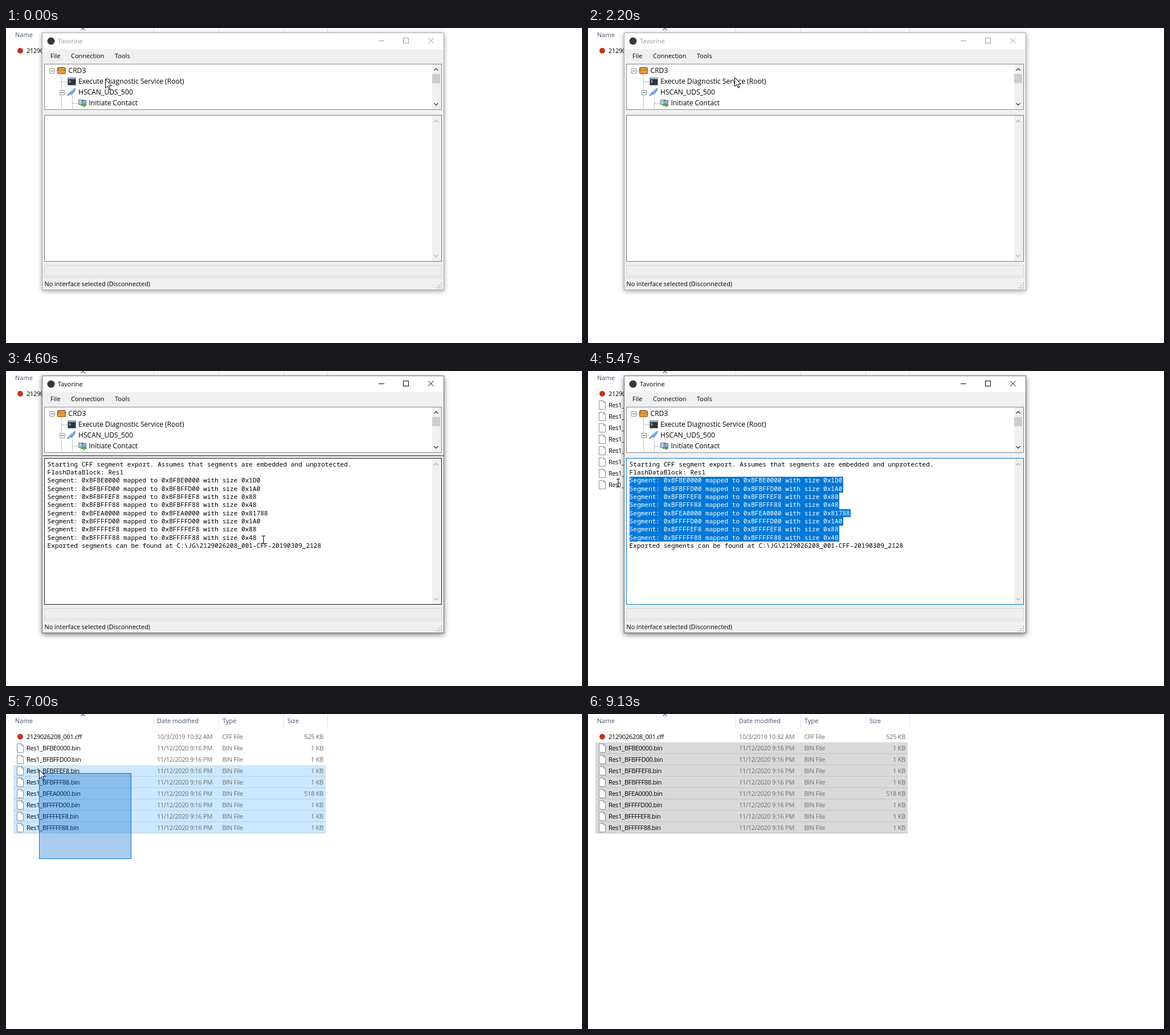
Recreate the animation shown at these times as an HTML page. Size 1011 by 554 pixels, loop 9.19 s.

```html
<!DOCTYPE html>
<html lang="en">
<head>
<meta charset="utf-8">
<title>Segment export</title>
<style>
html, body { margin: 0; width: 100%; height: 100%; overflow: hidden; background: #fff; }
svg { display: block; width: 1011px; height: 554px; }
text { font: 11px "Open Sans", "Noto Sans", sans-serif; fill: #000; white-space: pre; }
text.num { letter-spacing: -.3px; }
text.tree { font-size: 12.1px; }
text.status { font-size: 10.9px; }
text.mono { font: 500 11.13px "Noto Sans Mono", "DejaVu Sans Mono", monospace; }
rect { shape-rendering: crispEdges; }
</style>
</head>
<body>
<svg id="stage" viewBox="0 0 1011 554" xmlns="http://www.w3.org/2000/svg"></svg>
<script>
const TICK = 1000 / 15, LOOP = 9190;
const GREY = '#6d6d6d', BLUE = '#0078d7', HEAD = '#44546f';

// ---- drawing helpers ----
const box = (x, y, w, h, fill, stroke, more = '') => stroke
  ? `<rect x="${x + .5}" y="${y + .5}" width="${w - 1}" height="${h - 1}" fill="${fill}" stroke="${stroke}" ${more}/>`
  : `<rect x="${x}" y="${y}" width="${w}" height="${h}" fill="${fill}" ${more}/>`;
const line = (d, color, more = '') => `<path d="${d}" fill="none" stroke="${color}" ${more}/>`;
const fill = (d, color) => `<path d="${d}" fill="${color}"/>`;
const dot = (x, y, r, color) => `<circle cx="${x}" cy="${y}" r="${r}" fill="${color}"/>`;
const text = (x, mid, str, cls = '', color = '#000', more = '') =>
  `<text x="${x}" y="${mid + 4}" class="${cls}" style="fill:${color}" ${more}>${str}</text>`;
const group = (id, body, more = '') => `<g id="${id}" ${more}>${body}</g>`;
const chevron = (x, y, dir, color, s = 3.5) => {
  const turn = { up: 0, right: 90, down: 180 }[dir];
  return line(`M${-s} ${s / 2}L0 ${-s / 2}L${s} ${s / 2}`, color,
    `stroke-width="1.5" transform="translate(${x} ${y}) rotate(${turn})"`);
};
const grip = (x, y) => [[2, 0], [1, 1], [2, 1], [0, 2], [1, 2], [2, 2]]
  .map(([i, j]) => box(x + i * 4, y + j * 4, 2, 2, '#b4b4b4')).join('');

const shadow = (id, dev, dy, alpha) =>
  `<filter id="${id}" x="-10%" y="-10%" width="120%" height="120%">
  <feDropShadow dx="0" dy="${dy}" stdDeviation="${dev}" flood-opacity="${alpha}"/></filter>`;

// ---- icons ----
const cffIcon = (x, y) => dot(x, y, 5, '#c8321f');
const page = (x, y) =>
  `<path d="M${x + .5} ${y - 7.5}h8l3 3v12h-11z" fill="#fff" stroke="#8c8c8c"/>` +
  line(`M${x + 8.5} ${y - 7.5}v3h3`, '#8c8c8c');
const folder = (x, y) => box(x, y - 7, 6, 3, '#eec55c') + box(x, y - 6, 12, 14, '#fcdf8b', '#efcd6b');

// ---- file listing ----
const names = ['BFBE0000', 'BFBFFD00', 'BFBFFEF8', 'BFBFFF88', 'BFEA0000', 'BFFFFD00', 'BFFFFEF8', 'BFFFFF88'];
const sizes = ['1D0', '1A0', '88', '48', '81788', '1A0', '88', '48'];
const rowTop = i => 30 + i * 20;

function columns(x, y, h) {
  return text(x, y, 'Name', '', HEAD) + text(x + 249, y, 'Date modified', '', HEAD) +
    text(x + 364, y, 'Type', '', HEAD) + text(x + 478, y, 'Size', '', HEAD) +
    [243, 357, 471, 548].map(dx => box(x + dx, y - 12, 1, h, '#e3e3e3')).join('') +
    chevron(x + 119, y - 10, 'up', '#777');
}
function cells(x, y, name, date, type, size) {
  return text(x, y, name, 'num') + text(x + 229, y, date, 'num', GREY) +
    text(x + 343.5, y, type, 'num', GREY) + text(x + 521, y, size, 'num', GREY, 'text-anchor="end"');
}
const cffRow = (x, y) => cffIcon(x - 11, y) +
  cells(x, y, '2129026208_001.cff', '10/3/2019 10:32 AM', 'CFF File', '525 KB');

function explorer() {
  const bands = Array.from({ length: 9 }, (_, i) =>
    group('row' + i, box(13, rowTop(i), 548, 20, 'currentColor') +
      box(13, rowTop(i) + 19, 548, 1, '#000', '', `id="edge${i}" opacity=".1"`))).join('');
  const files = names.map((n, i) => page(19, rowTop(i + 1) + 10) +
    cells(36, rowTop(i + 1) + 10, `Res1_${n}.bin`, '11/12/2020 9:16 PM', 'BIN File', i == 4 ? '518 KB' : '1 KB')).join('');
  return columns(16, 12, 24) + bands + cffRow(36, 40) + group('files', files);
}

// ---- main window ----
const log = ['Starting CFF segment export. Assumes that segments are embedded and unprotected.',
  'FlashDataBlock: Res1',
  ...names.map((n, i) => `Segment: 0x${n} mapped to 0x${n} with size 0x${sizes[i]}`),
  'Exported segments can be found at C:\\JG\\2129026208_001-CFF-20190309_2128'];
const CHAR = 6.678, ROW = 14.3, LOGX = 72.6, LOGY = 156.9;
const logText = color => log.map((s, i) => text(LOGX, LOGY + ROW * (i + .5) - .2, s, 'mono', color)).join('');
const SEGS = [2, 3, 4, 5, 6, 7, 8, 9];

function tree() {
  const dots = d => line(d, '#8a8a8a', 'stroke-dasharray="1 1" shape-rendering="crispEdges"');
  const minus = (x, y) => box(x - 4, y - 4, 9, 9, '#fff', '#919191') + box(x - 2, y, 5, 1, '#3c5a96');
  return dots('M85 75.5H90M97.5 83V143M98 94.5H107M102 113.5H107M116.5 121V143M117 132.5H126') +
    minus(80, 75) + minus(98, 113) +
    fill('M90 71q0-2 2-2h9q4 0 4 3v7q0 2-2 2H92q-2 0-2-2z', '#9c560f') +
    fill('M91 74h13v5q0 1-1 1H92q-1 0-1-1z', '#e39a3a') + box(92, 71, 11, 2, '#f0c27c') +
    box(108, 87, 15, 14, '#2b3441', '#77899c') + box(109, 88, 13, 2, '#9fb2c8') + line('M110.5 92l3 2-3 2', '#fff') +
    line('M108 119l4-4M118 110l4-4', '#547bb0', 'stroke-width="2"') +
    fill('M111 113l7-6q3 0 4 3l-6 7q-4 1-5-4z', '#6da0dc') + line('M113 113l6-5', '#b9d6f6', 'stroke-width="1.5"') +
    box(127, 126, 10, 9, '#b9c8dc', '#66778c') + box(133, 127, 8, 10, '#8fb0dc', '#5f7390') +
    fill('M131 134h5v-3l5 4.500-5 4.500v-3h-5z', '#4aa83c') +
    text(109.5, 75, 'CRD3', 'tree') + text(127, 94, 'Execute Diagnostic Service (Root)', 'tree') +
    text(127, 113, 'HSCAN_UDS_500', 'tree') + text(145.5, 132, 'Initiate Contact', 'tree');
}

function mainWindow() {
  return box(63, 8, 706, 453, '#f0f0f0', '', 'id="frame"') +
    box(64, 9, 704, 28, '#fff') +
    dot(79, 23, 6.5, '#383838') + text(91, 22.5, 'Tavorine', '', '#000', 'id="title"') +
    group('buttons', `<path d="M654 22.500h10M697.500 17.500h9v9h-9z" shape-rendering="crispEdges"/><path d="M741 17.500l9.500 9.500M750.500 17.500l-9.500 9.500"/>`, 'fill="none" stroke="#000"') +
    box(182, 39, 45, 19, '#b5d7f3', BLUE, 'id="hot"') +
    text(78, 48.5, 'File') + text(114, 48.5, 'Connection') + text(191, 48.5, 'Tools') +
    box(67, 63, 698, 81, '#fff', '#828790') + tree() +
    box(748, 64, 16, 79, '#f0f0f0') + chevron(755, 73, 'up', '#444') + chevron(755, 134, 'down', '#444') +
    box(748, 81, 14, 16, '#cdcdcd') +
    group('split', line('M65 148.500H768M66 149.500H768', '#000', 'stroke-dasharray="1 1" shape-rendering="crispEdges"')) +
    box(67, 153, 698, 258, '#fff', '#7a7a7a', 'id="pane"') +
    box(748, 154, 16, 256, '#f0f0f0') + chevron(755, 164, 'up', '#b8b8b8') + chevron(755, 401, 'down', '#b8b8b8') +
    group('log', logText('#000') +
      SEGS.map(i => `<rect class="sel" fill="${BLUE}"/>`).join('') +
      `<clipPath id="selClip">${SEGS.map(() => '<rect class="cut"/>').join('')}</clipPath>` +
      `<g clip-path="url(#selClip)">${logText('#fff')}</g>`) +
    box(67, 417, 698, 20, '#eee', '#d4d4d4') + box(64, 439, 704, 1, '#dcdcdc') +
    text(67.5, 450, 'No interface selected (Disconnected)', 'status') + grip(755, 448) +
    box(63, 8, 706, 453, 'none', '#777', 'id="rim"');
}

function toolsMenu() {
  const items = ['Flash File Splicer', 'Export CFF Flash Segments', 'Fix Client Access Permissions'];
  return box(183, 57, 215, 66, '#fdfdfd', '#808080', 'filter="url(#menuShadow)"') +
    box(184, 58, 24, 64, '#f4f4f4') +
    items.map((s, i) => box(185, 59 + i * 21, 211, 21, '#b5d7f3', BLUE, `id="item${i}"`) +
      text(215, 69.5 + i * 21, s)).join('');
}

// ---- file dialog ----
function navPane() {
  const icon = {
    cube: fill('M104 282l6-3 7 3v9l-7 3-6-3z', '#35b5d3') + fill('M104 282l6 3v9l-6-3z', '#8fdcea'),
    desk: box(102, 303, 16, 12, '#1a8fe8', '#1a6fb5'),
    docs: box(104, 324, 12, 16, '#fff', '#8a8a8a') + line('M106 328.500h8M106 331.500h8M106 334.500h8M106 337.500h8', '#7a8ea5'),
    down: fill('M107 347h5v7h5l-7.500 8-7.500-8h5z', '#3382d8'),
    note: line('M109.500 383v-12q1 4 5 5', '#1f86dc', 'stroke-width="2"') + dot(107, 383, 2.800, '#1f86dc'),
    pics: box(102, 394, 16, 13, '#fff', '#8a8a8a') + box(104, 396, 12, 5, '#9ed3f2') + box(104, 401, 12, 4, '#3d7d9d'),
    film: box(103, 416, 14, 16, '#333') + box(106, 418, 8, 6, '#7a92c6') + box(106, 425, 8, 5, '#b58b57'),
    disk: box(102, 449, 15, 5, '#555') + box(113, 451, 2, 1, '#7ee06c') + box(102, 441, 6, 6, '#25a5e2'),
    more: fill('M100 472q4-4 9 0z', '#4d93cc')
  };
  return [141, 164, 187, 210, 233].map(y => folder(104, y)).join('') +
    box(94, 256, 16, 11, '#45b5ef', '#3a7ca8') + box(97, 269, 10, 1, '#6c7a86') + text(114, 263, 'T') +
    box(72, 436, 49, 22, '#d9d9d9') + Object.values(icon).join('') +
    box(121, 130, 14, 342, '#f0f0f0') + box(121, 224, 14, 212, '#cdcdcd') +
    chevron(128, 139, 'up', '#444') + chevron(128, 464, 'down', '#444');
}

function dialog() {
  const crumbs = [[211, 'This PC'], [271, 'Local Disk (C:)'], [364, 'JG'], [398, '2129026208_001-CFF-20190309_2128']];
  const arrow = (x, turn, color) => line('M5.500 0H-5M-1 -4.500L-5.500 0L-1 4.500', color,
    `stroke-width="1.500" transform="translate(${x} 83) rotate(${turn})"`);
  return box(71, 38, 902, 508, '#fff', '#5f6468', 'filter="url(#dialogShadow)"') +
    dot(87, 53, 6.5, '#383838') + text(99, 52, 'Select a CFF File') +
    line('M953 47l9 9M962 47l-9 9', '#000', 'stroke-width="1.200"') +
    arrow(90, 0, '#d0d0d0') + arrow(117, 180, '#d0d0d0') + chevron(140, 83, 'down', '#d0d0d0', 2.5) + arrow(160, 90, '#555') +
    box(173, 72, 585, 22, '#fff', '#d9d9d9') + folder(177, 82) +
    crumbs.map(([x, s], i) => chevron(x - 11, 82.5, 'right', '#555', 2.8) + text(x, 82, s, i == 3 ? 'num' : '')).join('') +
    chevron(727, 83.5, 'down', '#555') + box(736, 73, 1, 20, '#d9d9d9') +
    line('M749.500 80.500A3.800 3.800 0 1 1 745 79.500M750 77.500v3.500h-3.500', '#555', 'stroke-width="1.300"') +
    box(768, 72, 192, 22, '#fff', '#d9d9d9') + text(777, 82.5, 'Search 2129026208_001-CFF-2...', 'num', GREY) +
    `<circle cx="948.5" cy="81.5" r="3" fill="none" stroke="#555" stroke-width="1.300"/>` + line('M946.500 84l-4 4', '#555', 'stroke-width="1.500"') +
    box(72, 101, 900, 28, '#f5f6f7') + text(89, 114.5, 'Organize', '', '#1e395b') +
    fill('M138 112h8l-4 5z', '#1e395b') + text(175, 114.5, 'New folder', '', '#1e395b') +
    [0, 4, 8].map(d => box(856, 109 + d, 3, 2, '#71869f') + box(861, 109 + d, 4, 1, '#8b9bae') + box(867, 109 + d, 4, 1, '#8b9bae')).join('') +
    fill('M880 112h7l-3.500 5z', '#1e395b') + box(908, 109, 15, 11, '#fff', '#3c6893') + box(917, 110, 5, 9, '#2f91dc') +
    dot(950, 114.5, 7.5, '#0a62b5') + text(950, 114.5, '?', '', '#fff', 'text-anchor="middle" font-weight="700"') +
    navPane() +
    group('listing', columns(156, 142, 25) + box(154, 160, 547, 20, '#e5f3ff', '', 'id="dlgHover"') + cffRow(176, 170)) +
    box(72, 472, 900, 73, '#f0f0f0') +
    text(246, 492, 'File name:', '', '#000', 'text-anchor="end"') +
    box(252, 481, 513, 22, '#fff', BLUE) + chevron(756, 492.5, 'down', '#555') +
    box(776, 481, 180, 22, '#e1e1e1', '#adadad') + text(780.5, 492, 'CFF files (*.cff)') + chevron(946, 492.5, 'down', '#555') +
    box(778, 510, 81, 22, BLUE) + box(780, 512, 77, 18, '#e1e1e1') + text(818, 520.5, 'Open', '', '#000', 'text-anchor="middle"') +
    box(872, 510, 83, 22, '#e1e1e1', '#adadad') + text(913.5, 520.5, 'Cancel', '', '#000', 'text-anchor="middle"') +
    grip(961, 535);
}

const stage = document.getElementById('stage');
stage.innerHTML = '<defs>' + shadow('active', 5, 3, .5) + shadow('idle', 4, 2, .36) +
  shadow('dialogShadow', 5, 3, .5) + shadow('menuShadow', 1.5, 2, .35) + '</defs>' +
  explorer() + group('win', mainWindow()) + group('menu', toolsMenu()) + group('dialog', dialog()) +
  box(0, 0, 1, 1, 'rgba(0,102,204,.333)', BLUE, 'id="marquee"') +
  group('arrow', '<path d="M.5 .5V16l3.600-3.500 2.500 5.800 2.300-1-2.500-5.700h5z" fill="#fff" stroke="#000"/>') +
  group('beam', line('M-3 -7H-1L0 -6L1 -7H3M0 -6V6M-3 7H-1L0 6L1 7H3', '#000', 'stroke-width="1.100"'));

const el = {};
stage.querySelectorAll('[id]').forEach(e => el[e.id] = e);
const sel = stage.querySelectorAll('.sel'), cut = stage.querySelectorAll('.cut');
const set = (e, attrs) => { for (const a in attrs) e.setAttribute(a, attrs[a]); };
const show = (id, on) => { el[id].style.display = on ? '' : 'none'; };

// ---- motion: [tick, values...] ----
const mouse = [[0, 174, 90], [2, 212, 66], [4, 212, 66], [8, 225, 57], [11, 225, 57], [13, 205, 49], [23, 205, 49],
  [27, 257, 87], [36, 257, 87], [43, 255, 168], [48, 255, 168], [51, 256, 168], [59, 256, 168], [61, 244, 172],
  [69, 452, 297], [71, 452, 297], [82, 53, 197], [84, 53, 197], [89, 30, 225], [92, 30, 225], [98, 219, 225],
  [99, 219, 225], [101, 220, 254], [102, 220, 254], [105, 58, 98], [111, 44, 60], [113, 44, 60], [119, 40, 575]];
const lasso = [[102, 254], [105, 104], [111, 60]];

function along(keys, k) {
  let i = 0;
  while (i < keys.length - 2 && k >= keys[i + 1][0]) i++;
  const [a, b] = [keys[i], keys[i + 1]];
  const u = Math.min(1, Math.max(0, (k - a[0]) / (b[0] - a[0])));
  const e = u * u * (3 - 2 * u);
  return a.slice(1).map((v, j) => v + (b[j + 1] - v) * e);
}

function select(k, x, y) {
  const on = k >= 72;
  const row = Math.min(9, Math.max(2, Math.floor((y - LOGY) / ROW)));
  SEGS.forEach((r, i) => {
    const len = log[r].length;
    const col = r == row ? Math.min(len, Math.max(0, Math.round((x - LOGX) / CHAR))) : 0;
    const rect = { x: LOGX + col * CHAR, y: LOGY + r * ROW, height: ROW + .2,
      width: on && r >= row && col < len ? (len - col) * CHAR + 1 : 0 };
    set(sel[i], rect);
    set(cut[i], rect);
  });
}

function draw(ms) {
  const k = Math.floor(ms / TICK + .1);
  const [x, y] = along(mouse, k);
  const dlg = k >= 34 && k < 49, active = k >= 5 && k < 33 || k >= 49;
  const drag = k >= 103 && k < 114;

  show('win', k < 91);
  set(el.frame, { filter: `url(#${active ? 'active' : 'idle'})` });
  set(el.rim, { stroke: active ? '#707070' : '#aaa' });
  el.title.style.fill = active ? '#000' : '#999';
  set(el.buttons, { stroke: active ? '#000' : '#999' });
  show('split', active && k < 72);
  set(el.pane, { stroke: k >= 72 ? BLUE : k >= 51 ? '#171717' : '#7a7a7a' });
  show('log', k >= 51);
  const [sx, sy] = along(mouse, Math.min(k, 82));
  select(k, sx, sy);

  const open = k >= 19 && k < 33;
  show('hot', k >= 12 && k < 33);
  set(el.hot, { fill: open ? '#fdfdfd' : '#b5d7f3', stroke: open ? '#808080' : BLUE });
  show('menu', open);
  set(el.menu, { opacity: Math.min(1, (k - 18) / 3) });
  for (let i = 0; i < 3; i++) show('item' + i, y >= 59 + i * 21 && y < 80 + i * 21);

  show('dialog', dlg);
  set(el.dialog, { opacity: k == 34 ? .55 : 1 });
  show('listing', k >= 36);
  show('dlgHover', y >= 160 && y < 180);

  const [top] = along(lasso, k);
  show('files', k >= 76);
  for (let i = 0; i < 9; i++) {
    const chosen = i > 0 && k >= 103 && rowTop(i) + 20 > top && top < 230;
    const hover = k >= 85 && k < 103 && x >= 13 && y >= rowTop(i) && y < rowTop(i) + 20;
    show('row' + i, chosen || hover);
    show('edge' + i, chosen);
    el['row' + i].style.color = !chosen ? '#e5f3ff' : k >= 137 ? '#d9d9d9' : '#cce8ff';
  }
  show('marquee', drag);
  if (drag) set(el.marquee, { x: Math.round(x) + .5, y: Math.round(top) + .5,
    width: 219 - Math.round(x), height: 254 - Math.round(top) });

  const beam = k >= 54 && k < 85;
  show('beam', beam);
  show('arrow', !beam && (k < 51 || k >= 85));
  const at = { transform: `translate(${Math.round(x)} ${Math.round(y)})` };
  set(el.beam, at);
  set(el.arrow, at);
}

const start = performance.now();
function loop() {
  draw((performance.now() - start) % LOOP);
  requestAnimationFrame(loop);
}
draw(0);
requestAnimationFrame(loop);
</script>
</body>
</html>
```
